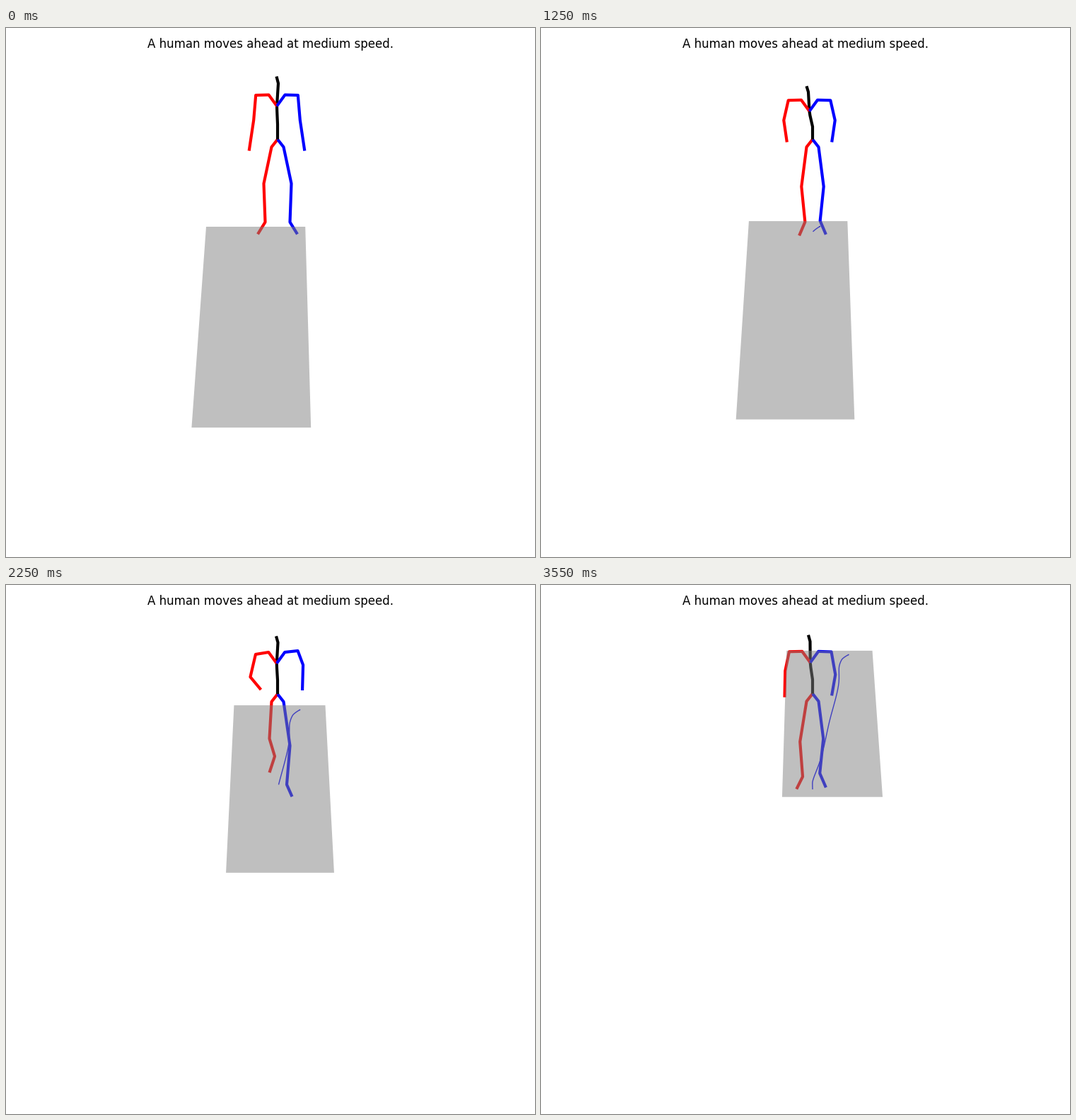
Recreate the animation shown at these times as a matplotlib script. Size 748 by 748 pixels, loop 3600 ms.

```python
import numpy as np
import matplotlib.pyplot as plt
from matplotlib.animation import FuncAnimation

SIZE, DPI = 748, 100
FRAMES, STEP = 72, 50  # ms per frame
TIME = np.arange(FRAMES) * STEP

# Floor camera: screen y = 1 / depth - HORIZON, x scales with the distance below it
CENTER, HORIZON, UNIT = 384, 1113, 1394
FLOOR_LEFT, FLOOR_WIDTH = -101, 140.2
FLOOR_FAR, FLOOR_LENGTH, ROOT_DEPTH = 717.36, 121.4, 713.52

# time (ms): sideways and forward travel of the walker
TRAVEL = {
    0: (0, 0), 600: (-0.2, 0), 1250: (10.4, 4.1), 1500: (16.2, 12.8),
    1700: (16.6, 22.5), 2250: (34.1, 62), 2650: (45.8, 88.1),
    3150: (58.7, 107.5), 3550: (58.5, 111.9),
}
# time (ms): sideways lean of the neck
LEAN = {0: 1, 800: -1, 1250: -6, 1700: 6, 2250: 0.5, 2650: 3, 3550: -3.5}

STRIDE, CONTACT = 800, 2650  # gait period, a moment the right foot lands


def smooth(keys):
    """Monotone cubic through the keys, sampled at every frame."""
    t = np.array(list(keys), float)
    y = np.array(list(keys.values()), float).reshape(len(t), -1)
    h = np.diff(t)[:, None]
    d = np.diff(y, axis=0) / h
    slope = np.zeros_like(y)
    a, b = d[:-1], d[1:]
    same = a * b > 0
    slope[1:-1] = np.where(same, 2 * a * b / np.where(same, a + b, 1), 0)

    k = np.clip(np.searchsorted(t, TIME, side="right") - 1, 0, len(t) - 2)
    w = h[k]
    u = (TIME - t[k])[:, None] / w
    return (y[k] * (1 + 2 * u) * (1 - u) ** 2 + y[k + 1] * u ** 2 * (3 - 2 * u)
            + w * (slope[k] * u * (1 - u) ** 2 - slope[k + 1] * u ** 2 * (1 - u)))


def ease(start, end):
    u = np.clip((TIME - start) / (end - start), 0, 1)
    return u * u * (3 - 2 * u)


def bump(center, width):
    return np.exp(-((TIME - center) / width) ** 2)


def point(x, y):
    return np.stack(np.broadcast_arrays(x, y, 0.0 * TIME)[:2], axis=-1)


def project(side, depth):
    drop = 1e6 / np.asarray(depth, float)
    return CENTER + np.asarray(side) * drop / UNIT, drop - HORIZON


travel = smooth(TRAVEL)
lean = smooth(LEAN)[:, 0]
gait = ease(1200, 1700) - 0.93 * ease(2900, 3550)   # size of the steps
ready = ease(500, 1600) - 0.4 * ease(2900, 3550)    # bent arms, narrow stance
phase = 2 * np.pi * (TIME - CONTACT) / STRIDE


def relax(rest, walk):
    return rest + ready * (walk - rest)


def build_spine():
    pelvis = (157.5 + 3.3 * gait * np.cos(phase) + 8.5 * bump(1750, 200)
              - 4 * ease(2700, 3500))
    height = 89 - 24 * bump(1550, 400) - 6 * ease(1500, 2200)
    chest = 0.5 * lean - 1.5
    offsets = [(0, 0), (0, 0.24), (0.8 * chest, 0.45), (chest, 0.53),
               (lean, 0.89), (lean - 2.5, 1)]
    return np.stack([point(CENTER + x, pelvis - part * height)
                     for x, part in offsets], axis=1)


def build_leg(side):
    """side is -1 for the right limb, 1 for the left one."""
    swing = phase if side < 0 else phase + np.pi
    c, lift = np.cos(swing), np.maximum(0, -np.sin(swing))
    hip = point(side * 8.5, 10.8)
    knee = point(side * relax(19.5, 14.5 + 3 * c), relax(62.5, 68 + 5 * c))
    ankle = point(side * relax(17.5, 8.5 + 4.5 * c),
                  117 + gait * (20 * c - 9 - 57 * lift))
    toe = ankle + point(side * relax(10.5, 7.5), relax(17, 20 - 3 * c))
    root = spine[:, 0]
    return np.stack([root, root + hip, root + knee, root + ankle, root + toe],
                    axis=1)


def build_arm(side):
    # arms swing against the leg of the same side
    c = np.cos(phase if side < 0 else phase + np.pi)
    bones = [
        point(side * 11.5, -15.8),
        point(side * 18.3, 0.5 - 2.5 * gait * c),
        point(side * relax(3, 7.5), relax(35.3, 26 - 6 * c)),
        point(side * relax(6.5, -8 + 7 * c), relax(43.3, 27 + 9 * c)),
    ]
    return np.cumsum(np.stack([spine[:, 3], *bones], axis=1), axis=1)


spine = build_spine()
chains = [
    (build_leg(-1), "red"), (build_leg(1), "blue"), (spine, "black"),
    (build_arm(-1), "red"), (build_arm(1), "blue"),
]

fig = plt.figure(figsize=(SIZE / DPI, SIZE / DPI), dpi=DPI, facecolor="white")
fig.suptitle("A human moves ahead at medium speed.", fontsize=12, y=0.9816)
ax = fig.add_axes([0, 0, 1, 1])
ax.set(xlim=(0, SIZE), ylim=(SIZE, 0))
ax.axis("off")

trail, = ax.plot([], [], color="blue", lw=1, zorder=2)
limbs = [
    ax.plot([], [], color=color, lw=3, solid_capstyle="butt",
            solid_joinstyle="round", zorder=3)[0]
    for _, color in chains
]
floor = plt.Polygon(np.zeros((4, 2)), facecolor=(0.5, 0.5, 0.5, 0.5),
                    edgecolor="none", lw=0, zorder=4)
ax.add_patch(floor)


def draw(i):
    side, ahead = travel[i]
    left = FLOOR_LEFT + side
    right = left + FLOOR_WIDTH
    far = FLOOR_FAR + ahead
    near = far - FLOOR_LENGTH
    floor.set_xy(np.column_stack(project([left, right, right, left],
                                         [far, far, near, near])))

    past = travel[:i]
    trail.set_data(*project(side - past[:, 0], ROOT_DEPTH + ahead - past[:, 1]))

    for line, (path, _) in zip(limbs, chains):
        line.set_data(path[i, :, 0], path[i, :, 1])
    return [floor, trail, *limbs]


anim = FuncAnimation(fig, draw, frames=FRAMES, interval=STEP, repeat=True,
                     repeat_delay=0, blit=False)
plt.show()
```
